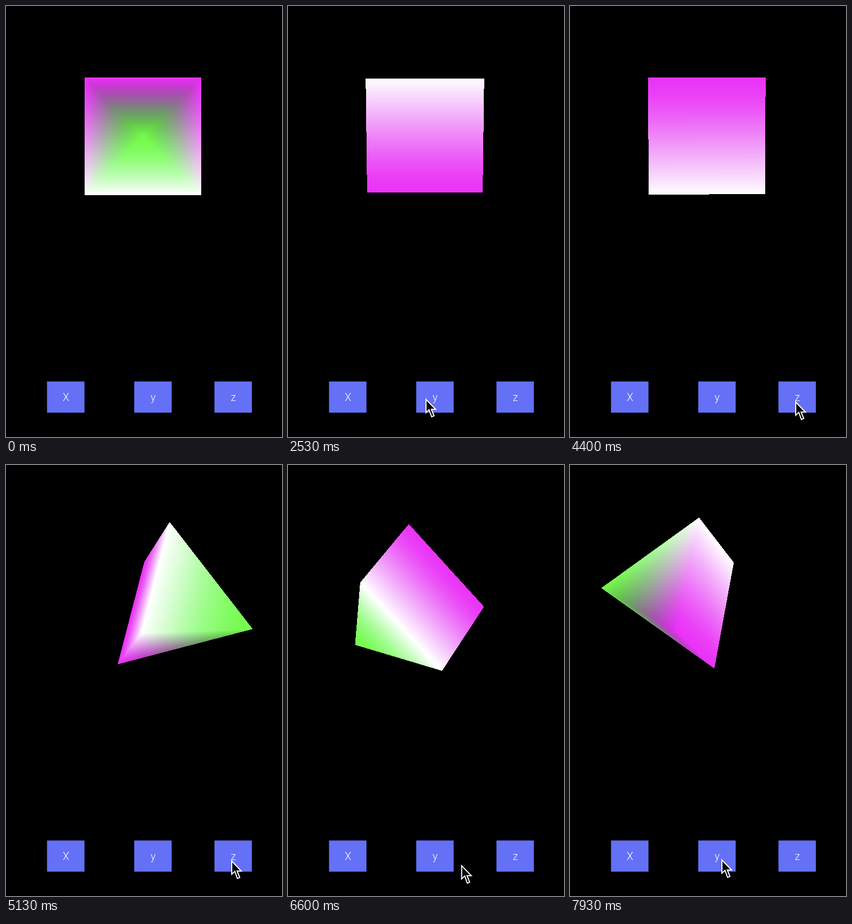
Animation of 516x802 px, one loop 8 s. Source, as an HTML page with a canvas:

```html
<!DOCTYPE html>
<html lang="en">
<head>
<meta charset="utf-8">
<title>Rotating pyramid</title>
<style>
  html, body { margin: 0; width: 100%; height: 100%; overflow: hidden; background: #000; }
  canvas, svg { position: absolute; left: 0; top: 0; width: 516px; height: 802px; }
  rect { width: 70px; height: 58px; fill: #6470f6; }
  text { font: 300 20px Roboto, sans-serif; fill: #fff; text-anchor: middle; }
  #cursor { fill: #000; stroke: #fff; stroke-width: 2; }
</style>
</head>
<body>
<canvas id="scene" width="516" height="802"></canvas>
<svg viewBox="0 0 516 802">
  <rect x="76.7" y="698.7"/><text x="112" y="735">X</text>
  <rect x="239.7" y="698.7"/><text x="275" y="735">y</text>
  <rect x="389.7" y="698.7"/><text x="425" y="735">z</text>
  <path id="cursor" d="M1 2V26.5L6.8 21.2L11.6 34.5L16 32.5L11 20.5H19Z"/>
</svg>
<script>
const LOOP = 8000, FPS = 15;
const CENTER = { x: 256, y: 242.3 }, UNIT = 109.4, CAMERA = 20;

// Base corners and apex. Red and blue are always equal: color = [red and blue, green].
const MAGENTA = [1, 0], WHITE = [1, 1], GREEN = [0, 1];
const vertices = [
  [-1, -1, 0, MAGENTA], [1, -1, 0, MAGENTA],
  [1, 1, 0, WHITE], [-1, 1, 0, WHITE],
  [0, 0, 2, GREEN],
];
const faces = [[0, 1, 4], [1, 2, 4], [2, 3, 4], [3, 0, 4], [1, 0, 3], [1, 3, 2]];

// Each button switches a steady spin on and off.
const SPEED = 100.7 * Math.PI / 180;
const spin = (t, start, stop = Infinity) => SPEED * Math.max(0, Math.min(t, stop) - start);

const moves = [
  { start: 0.06, end: 0.65, x: 108, y: 729, sag: 0 },
  { start: 0.95, end: 1.55, x: 257, y: 730, sag: 0 },
  { start: 2.65, end: 3.3, x: 269, y: 729, sag: 14 },
  { start: 3.45, end: 4.2, x: 421, y: 735, sag: 18 },
  { start: 6.22, end: 6.813, x: 283, y: 733, sag: 12.6 },
];

function pointerAt(t) {
  let x = 150, y = 802;
  for (const move of moves) {
    const p = Math.max(0, Math.min(1, (t - move.start) / (move.end - move.start)));
    const eased = p * p * (3 - 2 * p);
    x += (move.x - x) * eased;
    y += (move.y - y) * eased + move.sag * Math.sin(Math.PI * eased);
  }
  return { x, y };
}

function turn(p, q, angle) {
  const c = Math.cos(angle), s = Math.sin(angle);
  return [p * c - q * s, p * s + q * c];
}

function project([x, y, z, color], ax, ay, az) {
  [x, y] = turn(x, y, az);
  [z, x] = turn(z, x, ay);
  [y, z] = turn(y, z, ax);
  const scale = UNIT * CAMERA / (CAMERA - z);
  return { x: CENTER.x + x * scale, y: CENTER.y + y * scale, color };
}

const toLinear = v => v <= 0.04045 ? v / 12.92 : ((v + 0.055) / 1.055) ** 2.4;
const toByte = v => 255 * (v <= 0.0031308 ? v * 12.92 : 1.055 * v ** (1 / 2.4) - 0.055);

// sRGB to Display P3, which softens the pure colors.
function toDisplay(redBlue, green) {
  const m = toLinear(redBlue), g = toLinear(green);
  return [0.8225 * m + 0.1775 * g, 0.0332 * m + 0.9668 * g, 0.9276 * m + 0.0724 * g].map(toByte);
}

const cross = (a, b, x, y) => (b.x - a.x) * (y - a.y) - (b.y - a.y) * (x - a.x);
const clamp = v => Math.max(0, Math.min(1, v));

const ctx = document.getElementById('scene').getContext('2d');
const cursor = document.getElementById('cursor');
const WIDTH = 516, HEIGHT = 480;
const image = ctx.createImageData(WIDTH, HEIGHT);

function fillTriangle(a, b, c) {
  const area = cross(a, b, c.x, c.y);
  if (area <= 0) return;
  const left = Math.floor(Math.min(a.x, b.x, c.x)), right = Math.ceil(Math.max(a.x, b.x, c.x));
  const top = Math.floor(Math.min(a.y, b.y, c.y)), bottom = Math.ceil(Math.max(a.y, b.y, c.y));
  for (let y = top; y < bottom; y++) {
    for (let x = left; x < right; x++) {
      const wa = cross(b, c, x + 0.5, y + 0.5) / area;
      const wb = cross(c, a, x + 0.5, y + 0.5) / area;
      const wc = 1 - wa - wb;
      if (Math.min(wa, wb, wc) < -1e-9) continue;
      const mix = k => clamp(wa * a.color[k] + wb * b.color[k] + wc * c.color[k]);
      image.data.set([...toDisplay(mix(0), mix(1)), 255], (y * WIDTH + x) * 4);
    }
  }
}

function draw(t) {
  const angles = [spin(t, 0.885), -spin(t, 2.634, 7.31), spin(t, 4.72, 6.21)];
  const points = vertices.map(v => project(v, ...angles));
  image.data.fill(0);
  for (const face of faces) fillTriangle(...face.map(i => points[i]));
  ctx.putImageData(image, 0, 0);

  const { x, y } = pointerAt(t);
  cursor.style.visibility = t < moves[0].start ? 'hidden' : 'visible';
  cursor.setAttribute('transform', `translate(${x} ${y})`);
}

let shown = -1;
function tick() {
  const step = Math.floor((performance.now() % LOOP + 5) * FPS / 1000) % (LOOP * FPS / 1000);
  if (step !== shown) draw((shown = step) / FPS);
  requestAnimationFrame(tick);
}
tick();
</script>
</body>
</html>
```
